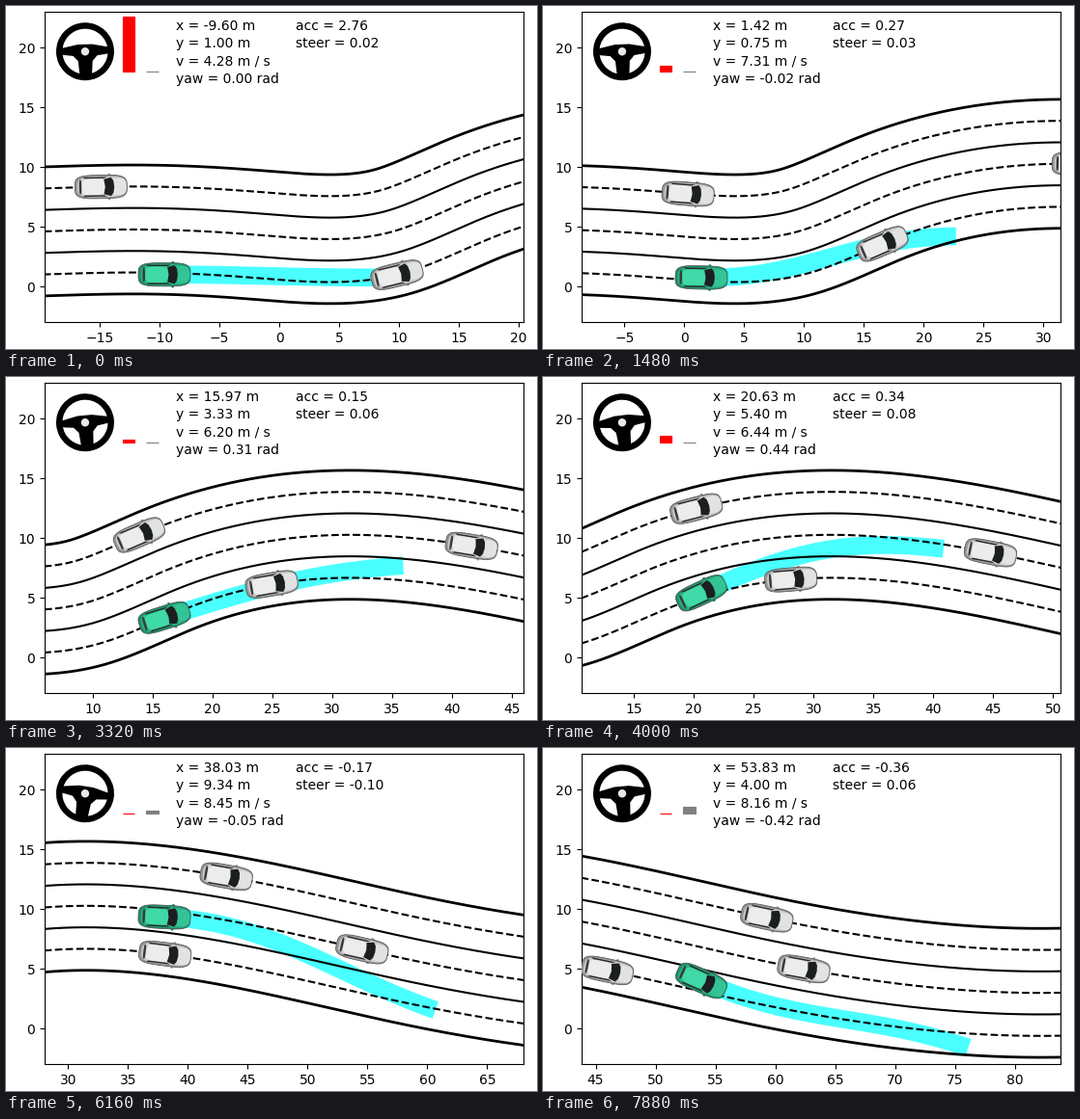
A matplotlib script that plays this animation: 550x356 px, repeating every 8 s.

```python
import numpy as np
import matplotlib.pyplot as plt
from matplotlib.animation import FuncAnimation
from matplotlib.patches import Polygon, Rectangle, Wedge, Circle
from matplotlib.transforms import Affine2D

FRAMES, INTERVAL = 200, 40
STEP_MS, DT = 85, 0.1
LANE = 3.6
WHEELBASE = 2.7
WHEEL_GAIN = 1.5


def spline(xs, ys):
    """Natural cubic spline through the given points."""
    xs, ys = np.asarray(xs, float), np.asarray(ys, float)
    h, d = np.diff(xs), np.diff(ys) / np.diff(xs)
    a, r = np.eye(len(xs)), np.zeros(len(xs))
    for i in range(1, len(xs) - 1):
        a[i, i - 1:i + 2] = h[i - 1], 2 * (h[i - 1] + h[i]), h[i]
        r[i] = 6 * (d[i] - d[i - 1])
    m = np.linalg.solve(a, r)

    def f(x):
        i = np.clip(np.searchsorted(xs, x, "right") - 1, 0, len(h) - 1)
        p, q = xs[i + 1] - x, x - xs[i]
        return ((m[i] * p**3 + m[i + 1] * q**3) / (6 * h[i])
                + (ys[i] / h[i] - m[i] * h[i] / 6) * p
                + (ys[i + 1] / h[i] - m[i + 1] * h[i] / 6) * q)
    return f


def hermite(ts, ps, ms, t):
    """Value and slope of the cubic with given values and slopes."""
    i = int(np.clip(np.searchsorted(ts, t, "right") - 1, 0, len(ts) - 2))
    h = ts[i + 1] - ts[i]
    u = (t - ts[i]) / h
    d = ps[i + 1] - ps[i]
    a, b = ms[i] * h - d, d - ms[i + 1] * h
    value = ps[i] + u * d + u * (1 - u) * (a * (1 - u) + b * u)
    slope = (d + (1 - 2 * u) * (a * (1 - u) + b * u)
             + u * (1 - u) * (b - a)) / h
    return value, slope


def offset(x, y, dist):
    """Shift a curve sideways along its normal."""
    a = np.arctan2(np.gradient(y), np.gradient(x))
    return x - dist * np.sin(a), y + dist * np.cos(a)


# Ego key states: time, x, y, speed, yaw, acceleration, steering
T, X, Y, V, YAW, ACC, STEER = np.array([
    (0.0, -9.60, 1.00, 4.28, 0.00, 2.76, 0.02),
    (1.8, 1.42, 0.75, 7.31, -0.02, 0.27, 0.03),
    (3.2, 11.15, 1.86, 6.36, 0.20, -0.65, 0.05),
    (4.8, 20.63, 5.40, 6.44, 0.44, 0.34, 0.08),
    (6.0, 27.87, 8.57, 6.90, 0.33, 0.63, -0.15),
    (7.3, 38.03, 9.34, 8.45, -0.05, -0.17, -0.10),
    (9.3, 53.83, 4.00, 8.16, -0.42, -0.36, 0.06)]).T

# Sideways goal and final heading of the planned path
goal_dy = spline(T, [-0.25, 3.45, 3.7, 3.7, -2.3, -7.8, -5.6])
goal_yaw = spline(T, [0, 0, 0.16, -0.12, -0.4, -0.34, -0.33])

road_x = np.arange(-20, 95, 0.1)
road_y = spline(
    [-20, -11, -3, 4.5, 10.6, 18, 30.9, 41, 57.9, 82, 95],
    [1, 1.17, 0.8, 0.37, 1.18, 4.18, 6.67, 5.8, 2.21, -0.62, 0])(road_x)
lanes = [offset(road_x, road_y, n * LANE) for n in range(3)]


def cruise(lane, start, speed):
    """Position over time at a steady speed along a lane."""
    x, y = lanes[lane]
    s = np.append(0, np.cumsum(np.hypot(np.diff(x), np.diff(y))))
    s0 = np.interp(start, x, s)
    return lambda t: np.interp(s0 + speed * t, s, x)


TRAFFIC = [
    (2, spline(T, [-14.9, 0.3, 8.7, 20.2, 31.7, 43.2, 59.3])),
    (0, cruise(0, 9.83, 4)),
    (1, cruise(1, 25.7, 4)),
]

fig = plt.figure(figsize=(5.5, 3.56), dpi=100)
ax = fig.add_axes([40.05 / 550, 27.7 / 356, 496 / 550, 322.2 / 356])
ax.set_ylim(-3, 23)

for n in range(-1, 6):
    edge = n in (-1, 5)
    ax.plot(*offset(road_x, road_y, n * LANE / 2), color="k",
            ls="-" if n % 2 else "--", lw=2 if edge else 1.5, zorder=2)

trail = Polygon(np.zeros((3, 2)), fc="#4affff", ec="none", zorder=1)
ax.add_patch(trail)


def oval(cx, cy, a, b, n):
    """Outline of a superellipse."""
    t = np.linspace(0, 2 * np.pi, 60)
    c, s = np.cos(t), np.sin(t)
    return np.column_stack([cx + a * np.sign(c) * abs(c) ** (2 / n),
                            cy + b * np.sign(s) * abs(s) ** (2 / n)])


def make_car(rim, body, hood, roof):
    """Top view of a car facing right; returns its movable transform."""
    move = Affine2D()

    def part(points, color, edge="none"):
        ax.add_patch(Polygon(points, fc=color, ec=edge, lw=0.5, zorder=4,
                             transform=move + ax.transData))

    for s in (1, -1):
        part(oval(0.7, s * 1.0, 0.12, 0.12, 2), rim)
    part(oval(0, 0, 2.18, 0.98, 3.8), rim, "#4a4a4a")
    part(oval(0.08, 0, 2.05, 0.86, 3.6), body)
    part(oval(1.45, 0, 0.66, 0.7, 2.8), hood)
    part(oval(-1.72, 0, 0.1, 0.6, 3), "#3a3a3a")
    for s in (1, -1):
        part([(-1.5, s * 0.82), (0.55, s * 0.82), (0.25, s * 0.7),
              (-1.35, s * 0.7)], "#2a2a2a")
    part(oval(-0.6, 0, 0.98, 0.66, 5), roof)
    part([(0.25, -0.62), (0.85, -0.78), (1.05, -0.5), (1.12, 0),
          (1.05, 0.5), (0.85, 0.78), (0.25, 0.62), (0.36, 0)], "#1c1f20")
    return move


moves = [make_car("#969696", "#cfcfcf", "#e2e2e2", "#ececec")
         for _ in TRAFFIC]
ego = make_car("#1f8f6b", "#2ab488", "#33c496", "#40d9a8")

# Panel coordinates: x relative to the ego car, y as on the axis
panel = Affine2D().scale(1 / 40, 1 / 26).translate(0.25, 3 / 26) + ax.transAxes

wheel = Affine2D()
spokes = [(0.6, 0.6), (2.1, 0.3), (2.1, -0.2), (1.0, -0.35), (0.6, -0.8),
          (0.5, -2.1)]
for p in (Wedge((0, 0), 2.42, 0, 360, width=0.52, fc="k", ec="none"),
          Polygon(spokes + [(-x, y) for x, y in spokes[::-1]],
                  fc="k", ec="none"),
          Circle((0, 0), 0.34, fc="#e8e8e8", ec="none")):
    p.set_transform(wheel + panel)
    ax.add_patch(p)


def bar(x, color):
    r = Rectangle((x - 0.5, 18), 1, 0, fc=color, ec=color, lw=0.8,
                  transform=panel)
    return ax.add_patch(r)


gas, brake = bar(-3, "red"), bar(-1, "gray")

labels = [ax.text(1 + 10 * (i // 4), 21.5 - 1.5 * (i % 4), "",
                  transform=panel, fontsize=10) for i in range(6)]


def plan(x, y, v, yaw, t):
    """Band around a Bezier curve from the car to its goal."""
    reach = 12.5 + 1.2 * v
    a = goal_yaw(t)
    start = np.array([x, y])
    end = start + [reach, goal_dy(t)]
    c1 = start + 0.4 * reach * np.array([np.cos(yaw), np.sin(yaw)])
    c2 = end - 0.4 * reach * np.array([np.cos(a), np.sin(a)])
    u = np.linspace(0, 1, 50)[:, None]
    px, py = ((1 - u)**3 * start + 3 * u * (1 - u)**2 * c1
              + 3 * u**2 * (1 - u) * c2 + u**3 * end).T
    left = np.column_stack(offset(px, py, 0.75))
    right = np.column_stack(offset(px, py, -0.75))
    return np.vstack([left, right[::-1]])


def update(frame):
    t = DT * int(frame * INTERVAL / STEP_MS + 0.98)
    x, _ = hermite(T, X, V * np.cos(YAW), t)
    y, _ = hermite(T, Y, V * np.sin(YAW), t)
    v, acc = hermite(T, V, ACC, t)
    yaw, rate = hermite(T, YAW, V * np.tan(STEER) / WHEELBASE, t)
    steer = np.arctan(WHEELBASE * rate / v)

    ax.set_xlim(x - 10, x + 30)
    ego.clear().rotate(yaw).translate(x, y)
    for move, (lane, pos) in zip(moves, TRAFFIC):
        cx = float(pos(t))
        y0, y1, y2 = np.interp([cx - 0.5, cx, cx + 0.5], *lanes[lane])
        move.clear().rotate(np.arctan(y2 - y0)).translate(cx, y1)

    trail.set_xy(plan(x, y, v, yaw, t))
    wheel.clear().rotate(WHEEL_GAIN * steer).translate(-6.62, 19.68)
    gas.set_height(max(acc, 0) * 5 / 3)
    brake.set_height(max(-acc, 0) * 5 / 3)

    lines = [f"x = {x:.2f} m", f"y = {y:.2f} m", f"v = {v:.2f} m / s",
             f"yaw = {yaw:.2f} rad", f"acc = {acc:.2f}",
             f"steer = {steer:.2f}"]
    for label, line in zip(labels, lines):
        label.set_text(line)
    return []


anim = FuncAnimation(fig, update, frames=FRAMES, interval=INTERVAL,
                     repeat=True, repeat_delay=0)
plt.show()
```
